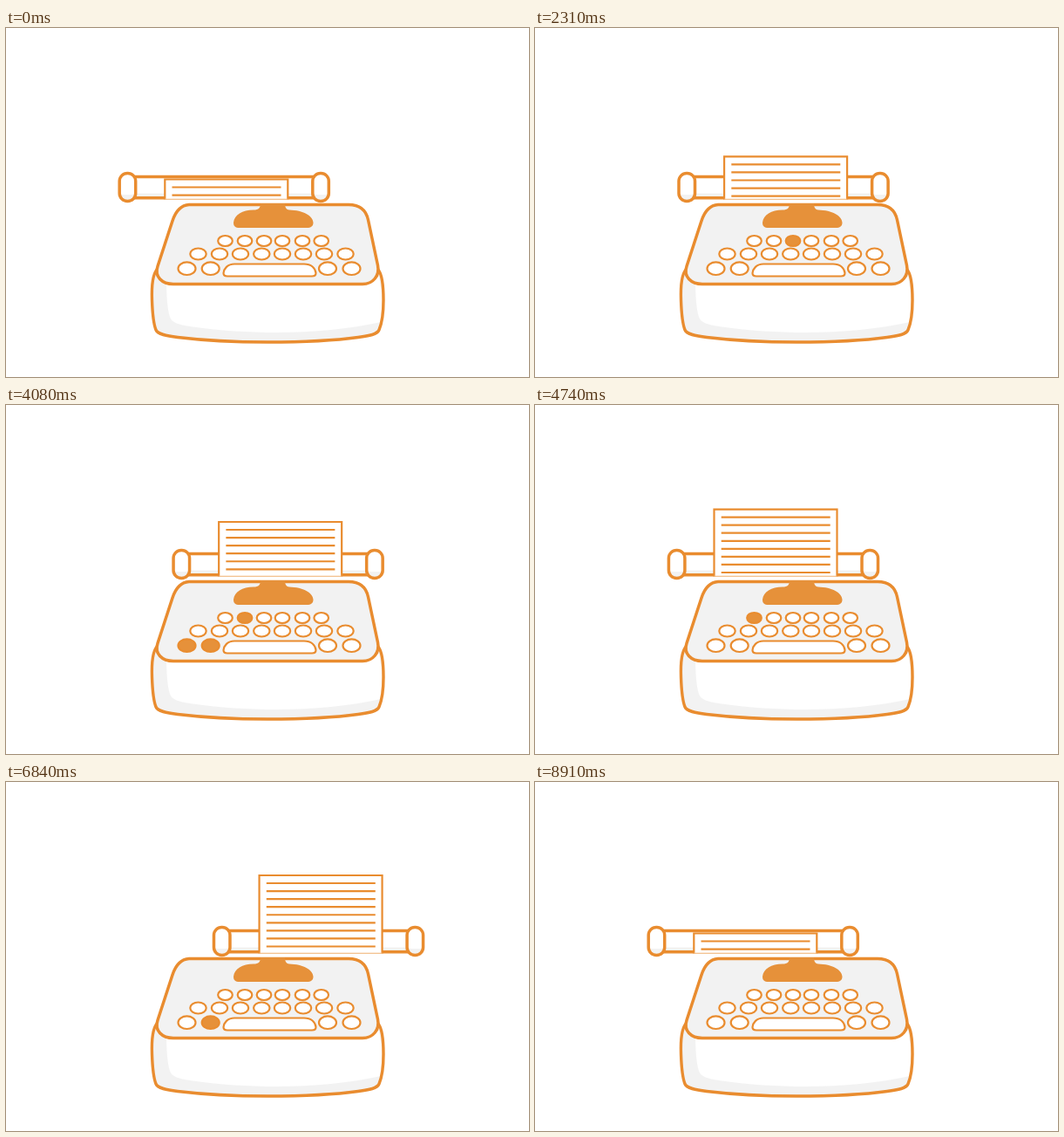
An HTML page with a canvas for the animation above (9000 ms loop, 600 by 400 pixels).

```html
<!DOCTYPE html>
<html lang="en">
<head>
<meta charset="utf-8">
<title>Typewriter</title>
<style>
html, body { margin: 0; width: 100%; height: 100%; overflow: hidden; background: #fff; }
canvas { display: block; }
</style>
</head>
<body>
<canvas id="stage" width="600" height="400"></canvas>
<script>
const ctx = document.getElementById('stage').getContext('2d');
const LINE = '#e98c2f', INK = '#e6913a', SHADE = '#f2f2f2';
const LOOP = 9000, TICK = 30;

// Carriage: slow glide right, quick return; the paper feeds during each return.
const CYCLE = 1200, GLIDE = 900, TRAVEL = 116, CYCLES = 7;
const PAPER_TOPS = [173.5, 153, 145, 134, 116, 107, 96.7, 173.5];

const ROWS = [
  { y: 244, rx: 8.3, ry: 6, xs: [251.5, 274, 296, 317, 340, 361.7] },
  { y: 259, rx: 9.2, ry: 6.5, xs: [220.5, 245, 269, 293.3, 317, 341, 365, 389.5] },
  { y: 275.7, rx: 10, ry: 7.3, xs: [207.5, 234.7, 369, 396.5] }
];

// Presses within one typing round: row, key, start, duration.
const ROUND = 1410, TYPING_END = 8460;
const PRESSES = [
  [2, 2, 30, 90], [2, 3, 30, 120], [0, 3, 120, 90], [1, 1, 180, 90],
  [0, 5, 240, 90], [1, 7, 300, 120], [1, 4, 420, 90], [0, 0, 480, 120],
  [1, 2, 570, 90], [0, 4, 630, 120], [1, 6, 720, 90], [1, 0, 780, 120],
  [0, 2, 870, 90], [1, 5, 930, 120], [1, 3, 1050, 120],
  [2, 1, 1170, 150], [0, 1, 1230, 120], [2, 0, 1230, 150]
];

function shape(path, fill, width) {
  if (fill) {
    ctx.fillStyle = fill;
    ctx.fill(path);
  }
  if (width) {
    ctx.strokeStyle = LINE;
    ctx.lineWidth = width;
    ctx.stroke(path);
  }
}

function box(x, y, w, h, r = 0) {
  const path = new Path2D();
  path.roundRect(x, y, w, h, r);
  return path;
}

const base = new Path2D('M173 277C168 283 167 298 167.5 312C168 327 170 341 172 346C174 351 184 353 197 354.5C230 358.5 265 360 300 360C335 360 375 358.5 404 354.5C417 353 426 351 428 346C431 339 433 325 433 312C433 298 432 283 427 277Z');
const baseLight = new Path2D('M184 288C184 305 185 322 188 331C190 338 199 340 211 342C245 347 280 349 310 349C352 349 395 345 430 337L432 310L428 285Z');
const panel = new Path2D('M210 202.5H393C406 202.5 413 208 415.5 220L426.5 272C429 284 421 293.5 409 293.5H192C179 293.5 170 285 174 273L191 221C195 209 201 203 210 202.5Z');
const ribbon = new Path2D('M292 201H320C320 205 321 208 325 208.5C341 209 352 215 352.5 223C352.5 227 350 229 345 229H268C263 229 261 227 261 223C262 214 271 208.5 284 208.5C290 208.5 292 206 292 201Z');
const spaceBar = new Path2D('M262 270.5H342C350 270.5 355 275 355.5 281C355.5 283.5 354 284.5 351 284.5H254C251 284.5 249.5 283.5 249.5 281C250 276 254 270.5 262 270.5Z');

function carriageAt(t) {
  const cycle = Math.floor(t / CYCLE);
  if (cycle >= CYCLES) return { x: 0, top: PAPER_TOPS[CYCLES] };
  const local = t % CYCLE;
  const back = Math.max(0, (local - GLIDE) / (CYCLE - GLIDE));
  const from = PAPER_TOPS[cycle], to = PAPER_TOPS[cycle + 1];
  return {
    x: TRAVEL * (back ? 1 - back : local / GLIDE),
    top: from + (to - from) * back
  };
}

function isPressed(row, key, t) {
  if (t >= TYPING_END) return false;
  const local = t % ROUND;
  return PRESSES.some(([r, k, start, length]) =>
    r === row && k === key && local >= start && local < start + length);
}

function drawKnob(x) {
  const knob = box(x, 166.5, 18.5, 32, 9);
  shape(knob, '#fff');
  ctx.save();
  ctx.clip(knob);
  ctx.fillStyle = SHADE;
  ctx.fillRect(x, 191, 19, 8);
  ctx.restore();
  shape(knob, null, 3.5);
}

function drawPaper(top) {
  ctx.save();
  ctx.beginPath();
  ctx.rect(170, 80, 170, 116.5);
  ctx.clip();
  shape(box(182.3, top, 141, 196 - top), '#fff');
  const edge = new Path2D();
  edge.moveTo(182.3, 197);
  edge.lineTo(182.3, top);
  edge.lineTo(323.3, top);
  edge.lineTo(323.3, 197);
  shape(edge, null, 2.2);
  const lines = new Path2D();
  for (let y = top + 9; y < 194; y += 9.06) {
    lines.moveTo(190.5, y);
    lines.lineTo(315.5, y);
  }
  shape(lines, null, 2.2);
  ctx.restore();
  ctx.fillStyle = '#f3c08d';
  ctx.fillRect(182, 195.7, 141.5, 0.8);
}

function drawCarriage(t) {
  const { x, top } = carriageAt(t);
  ctx.save();
  ctx.translate(x, 0);
  const roller = box(145, 170.5, 210, 24.2);
  shape(roller, '#fff');
  ctx.fillStyle = SHADE;
  ctx.fillRect(148, 189.5, 204, 5);
  shape(roller, null, 3.4);
  drawPaper(top);
  drawKnob(130.2);
  drawKnob(351.8);
  ctx.restore();
}

function drawMachine(t) {
  shape(base, SHADE);
  ctx.save();
  ctx.clip(base);
  shape(baseLight, '#fff');
  ctx.restore();
  shape(base, null, 3.4);
  shape(panel, SHADE, 3.5);
  shape(ribbon, INK);
  shape(spaceBar, '#fff', 2.2);
  ROWS.forEach(({ y, rx, ry, xs }, row) => xs.forEach((x, key) => {
    const cap = new Path2D();
    cap.ellipse(x, y, rx, ry, 0, 0, Math.PI * 2);
    shape(cap, isPressed(row, key, t) ? INK : '#fff', 2.2);
  }));
}

function draw(t) {
  ctx.fillStyle = '#fff';
  ctx.fillRect(0, 0, 600, 400);
  drawCarriage(t);
  drawMachine(t);
}

const begin = performance.now();
function frame() {
  const elapsed = (performance.now() - begin) % LOOP;
  draw(Math.floor(elapsed / TICK) * TICK);
  requestAnimationFrame(frame);
}
frame();
</script>
</body>
</html>
```
